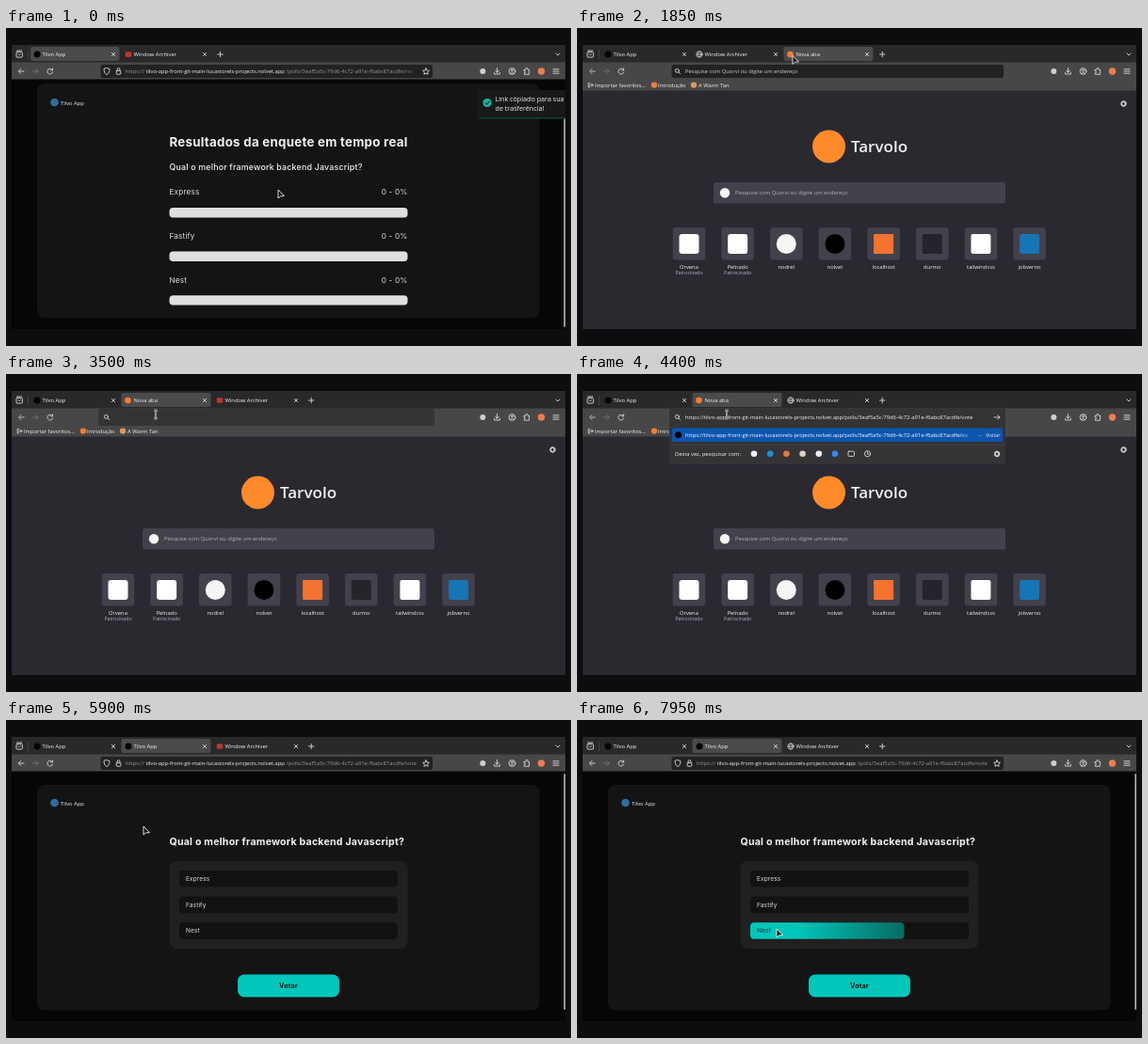
An HTML page for the animation above (8000 ms loop, 600 by 338 pixels).

```html
<!DOCTYPE html>
<html lang="pt-BR">
<head>
<meta charset="utf-8">
<title>Enquete em tempo real</title>
<style>
html, body { margin: 0; width: 100%; height: 100%; overflow: hidden; background: #0d0c0e; }
svg { display: block; width: 100vw; height: 100vh; }
text { font: 5.8px "Open Sans", "Noto Sans", sans-serif; fill: #f2f2f2; }
.page text { font-family: Inter, sans-serif; letter-spacing: .02em; }
.page .brand { font-size: 8.4px; font-weight: 700; letter-spacing: 0; }
.page .title { font-size: 13.3px; font-weight: 700; }
.page .ask { font-size: 8.9px; font-weight: 500; }
.page .row { font-size: 8.2px; fill: #dedede; }
.page .poll { font-size: 10.6px; font-weight: 700; }
.page .choice { font-size: 6.5px; fill: #dedede; }
.page .vote { font-size: 7.2px; font-weight: 700; fill: #0b1514; text-anchor: middle; }
.end { text-anchor: end; }
.mid { text-anchor: middle; }
.dim, .dim text { fill: #989898; }
.line { fill: none; stroke: #d8d8d8; stroke-width: .9; stroke-linecap: round; stroke-linejoin: round; }
.faint { stroke: #777; }

/* hard scene changes over one 8 s loop */
.cut { opacity: 0; animation: 8s step-end infinite; }
.results { animation-name: results; }
.later { animation-name: later; }
.newtab { animation-name: newtab; }
.search { animation-name: search; }
.focus { animation-name: focus; }
.list { animation-name: list; }
.blank { animation-name: blank; }
.loading { animation-name: loading; }
.loaded { animation-name: loaded; }
.skeleton { animation-name: skeleton; }
.address { animation-name: address; }
.idle { animation-name: idle; }
.plusHover { animation-name: plusHover; }
.arrow { animation-name: arrow; }
.hand { animation-name: hand; }
.beam { animation-name: beam; }
@keyframes results { 0% { opacity: 1 } 21.875%, 100% { opacity: 0 } }
@keyframes later { 0% { opacity: 0 } 21.875%, 100% { opacity: 1 } }
@keyframes newtab { 0% { opacity: 0 } 21.875% { opacity: 1 } 58.75%, 100% { opacity: 0 } }
@keyframes search { 0% { opacity: 0 } 21.875% { opacity: 1 } 41.875%, 100% { opacity: 0 } }
@keyframes focus { 0% { opacity: 0 } 41.875% { opacity: 1 } 57.5%, 100% { opacity: 0 } }
@keyframes list { 0% { opacity: 0 } 47.5% { opacity: 1 } 57.5%, 100% { opacity: 0 } }
@keyframes blank { 0% { opacity: 0 } 21.875% { opacity: 1 } 57.5%, 100% { opacity: 0 } }
@keyframes loading { 0% { opacity: 0 } 57.5% { opacity: 1 } 66.25%, 100% { opacity: 0 } }
@keyframes loaded { 0% { opacity: 0 } 66.25%, 100% { opacity: 1 } }
@keyframes skeleton { 0% { opacity: 0 } 58.75% { opacity: 1 } 66.25%, 100% { opacity: 0 } }
@keyframes address { 0% { opacity: 0 } 57.5%, 100% { opacity: 1 } }
@keyframes idle { 0% { opacity: 1 } 57.5% { opacity: 0 } 66.25%, 100% { opacity: 1 } }
@keyframes plusHover { 0% { opacity: 0 } 17% { opacity: 1 } 21.875%, 100% { opacity: 0 } }
@keyframes arrow { 0% { opacity: 1 } 26.25% { opacity: 0 } 36.25% { opacity: 1 } 39.5% { opacity: 0 } 65% { opacity: 1 } 100% { opacity: 1 } }
@keyframes hand { 0% { opacity: 0 } 26.25% { opacity: 1 } 36.25%, 100% { opacity: 0 } }
@keyframes beam { 0% { opacity: 0 } 39.5% { opacity: 1 } 65%, 100% { opacity: 0 } }

/* continuous motion */
.move { animation: 8s linear infinite; }
.toast { animation-name: toast; }
.scroll { animation-name: scroll; }
.recTab { animation-name: recTab; }
.newTabDrag { animation-name: drag; }
.rec { animation-name: rec; }
.globe { animation-name: globe; }
.pointer { animation-name: pointer; animation-timing-function: ease-in-out; }
.fill { width: 0; animation-name: fill; }
.page .picked { animation-name: picked; }
.dot { animation: dot .9s ease-in-out infinite alternate; }
@keyframes toast { 0%, .6% { transform: none } 5.6%, 100% { transform: translateX(100px) } }
@keyframes scroll { 0%, 1.2% { transform: none } 3.8%, 100% { transform: translateY(-2px) } }
@keyframes recTab { 0%, 30.625% { transform: none } 32.44%, 100% { transform: translateX(97px) } }
@keyframes drag {
  0%, 26.25% { transform: translateX(97px) } 31.25%, 31.875% { transform: translateX(50px) }
  35.6% { transform: translateX(3px) } 36.25%, 100% { transform: none }
}
@keyframes rec {
  0%, 8.125% { opacity: 1 } 14.375%, 26.875% { opacity: 0 } 33.125%, 45.625% { opacity: 1 }
  51.875%, 64.375% { opacity: 0 } 70.625%, 83.125% { opacity: 1 } 89.375%, 100% { opacity: 0 }
}
@keyframes globe {
  0%, 8.125% { opacity: 0 } 14.375%, 26.875% { opacity: 1 } 33.125%, 45.625% { opacity: 0 }
  51.875%, 64.375% { opacity: 1 } 70.625%, 83.125% { opacity: 0 } 89.375%, 100% { opacity: 1 }
}
@keyframes pointer {
  0%, 11.875% { transform: translate(289px, 172px) }
  17.5%, 22.5% { transform: translate(228px, 29px) }
  25.6%, 26.25% { transform: translate(239px, 33px) }
  31.25%, 31.875% { transform: translate(192px, 33px) }
  35.6%, 37.5% { transform: translate(145px, 33px) }
  40.6%, 65% { transform: translate(159px, 43px) }
  73%, 81% { transform: translate(146px, 113px) }
  94%, 100% { transform: translate(212px, 222px) }
}
@keyframes fill { 0%, 95% { width: 0 } 99.375% { width: 163px } 100% { width: 184px } }
@keyframes picked { 0%, 95% { fill: #dedede } 97%, 100% { fill: #10302d } }
@keyframes dot { from { transform: translateX(-2px) } to { transform: translateX(4px) } }
</style>
</head>
<body>
<svg viewBox="0 0 600 338" preserveAspectRatio="none">
<defs>
  <clipPath id="view"><rect x="6" y="54" width="588" height="266"/></clipPath>
  <linearGradient id="teal"><stop offset=".3" stop-color="#00c7b9"/><stop offset="1" stop-color="#086b64"/></linearGradient>
  <linearGradient id="fadeGrey" gradientUnits="userSpaceOnUse" x1="420" x2="441" y1="0" y2="0">
    <stop stop-color="#989898"/><stop offset="1" stop-color="#989898" stop-opacity="0"/></linearGradient>
  <linearGradient id="fadeRow" gradientUnits="userSpaceOnUse" x1="408" x2="424" y1="0" y2="0">
    <stop stop-color="#fff"/><stop offset="1" stop-color="#fff" stop-opacity="0"/></linearGradient>
  <path id="close" class="line" d="M-1.7-1.7 1.7 1.7M1.7-1.7-1.7 1.7"/>
  <g id="lens" class="line"><circle cx="-.6" cy="-.6" r="2"/><path d="M1 1 2.7 2.7"/></g>
  <g id="gear" class="line"><circle r="2.6" stroke-width="1.2" stroke-dasharray="1.3 .74"/><circle r="1.9"/></g>
  <g id="brand"><circle cx="51.5" cy="88" r="4.3" fill="#2c6f9f"/><text class="brand" x="58" y="91.2">Tilvo App</text></g>
  <g id="secure" class="line">
    <path d="M107 42.6 110 43.6C110 46.5 109 48.4 107 49.6 105 48.4 104 46.5 104 43.6Z"/>
    <rect x="117.2" y="45.4" width="4.6" height="3.8" rx=".7"/><path d="M118.1 45.2V44A1.4 1.4 0 0 1 120.9 44V45.2"/>
    <path d="M446 42.8 447 45 449.4 45.3 447.6 46.9 448.1 49.3 446 48.1 443.9 49.3 444.4 46.9 442.6 45.3 445 45Z"/>
  </g>
  <g id="domain"><text x="127" y="48.1" class="dim">https://</text><text x="148.5" y="48.1">tilvo-app-front-git-main-lucastorels-projects.nolvet.app</text></g>
</defs>

<rect width="600" height="338" fill="#0d0c0e"/>
<rect x="6" y="18" width="588" height="302" fill="#060606"/>

<g clip-path="url(#view)">
  <g class="page">
    <g class="cut results">
      <g class="move scroll">
        <rect x="33" y="59" width="533.5" height="249" rx="8" fill="#141415"/>
        <use href="#brand" y="-9"/>
        <text class="title" x="173.5" y="125.5">Resultados da enquete em tempo real</text>
        <text class="ask" x="173.5" y="151.3">Qual o melhor framework backend Javascript?</text>
        <g id="bars"></g>
      </g>
      <rect x="592.4" y="67" width="1.6" height="251" rx=".8" fill="#b4b4b4"/>
    </g>
    <g class="cut skeleton">
      <rect x="33" y="69" width="533.5" height="237" rx="8" fill="#141415"/>
      <use href="#brand"/>
      <rect x="173.5" y="122" width="253" height="21" rx="7" fill="#202020"/>
      <rect x="246" y="170.5" width="108" height="24" rx="7" fill="#00c7b9"/>
      <text class="vote" x="300" y="185.3">Votar</text>
    </g>
    <g class="cut loaded">
      <rect x="33" y="69" width="533.5" height="239.5" rx="8" fill="#141415"/>
      <use href="#brand"/>
      <text class="poll" x="173.5" y="133">Qual o melhor framework backend Javascript?</text>
      <rect x="173.5" y="150" width="253" height="93" rx="8" fill="#202020"/>
      <g id="choices"></g>
      <rect x="246" y="270.5" width="108" height="24" rx="7" fill="#00c7b9"/>
      <text class="vote" x="300" y="285.3">Votar</text>
      <rect x="592.4" y="57" width="1.6" height="251" rx=".8" fill="#b4b4b4"/>
    </g>
  </g>

  <g class="cut newtab">
    <rect x="6" y="54" width="588" height="266" fill="#2a2930"/>
    <rect x="6" y="54" width="588" height="12.5" fill="#474747"/>
    <path class="line" d="M13.5 58.5H12.2V63H13.5M13.6 60.7H17M15.6 59.3 17 60.7 15.6 62.1"/>
    <text x="19" y="62.8">Importar favoritos…</text>
    <circle cx="82" cy="60.6" r="3.2" fill="#f77b33"/><text x="86" y="62.8">Introdução</text>
    <circle cx="124" cy="60.6" r="3.2" fill="#d99a62"/><text x="129" y="62.8">A Warm Tan</text>
    <use href="#gear" x="580.5" y="80.5"/>
    <circle cx="267.5" cy="126" r="17.5" fill="#ff8a2a"/>
    <text x="291" y="132" style="font-size:17px;font-weight:600">Tarvolo</text>
    <rect x="145" y="164" width="310" height="22.5" rx="2.5" fill="#42414c"/>
    <circle cx="157" cy="175.3" r="5.2" fill="#f4f4f4"/>
    <text x="168" y="177.4" style="fill:#b4b3bc">Pesquise com Quorvi ou digite um endereço</text>
    <g id="tiles"></g>
  </g>

  <g class="cut results"><g class="move toast">
    <rect x="501" y="66" width="150" height="30.5" rx="2.5" fill="#181919"/>
    <rect x="502" y="95" width="149" height="1.4" fill="#0d453d"/>
    <circle cx="511" cy="79.5" r="4.6" fill="#13b49f"/>
    <path d="M508.8 79.6 510.5 81.3 513.4 77.9" fill="none" stroke="#181919" stroke-width="1.1"/>
    <text x="519.5" y="77.6" style="font-size:7.2px">Link copiado para sua área</text>
    <text x="519.5" y="87.8" style="font-size:7.2px">de trasferência!</text>
  </g></g>

  <g class="cut skeleton">
    <rect x="6" y="310.5" width="146" height="9.5" rx="1" fill="#3a3a3a"/>
    <text x="8" y="317.6" style="font-size:5.6px">tilvo-app-front-git-main-lucastorels-projects.nolvet.app</text>
  </g>
</g>

<!-- tab strip -->
<rect x="6" y="18" width="588" height="19" fill="#292929"/>
<g class="line"><rect x="11" y="25.5" width="6.4" height="5.6" rx="1"/><path d="M11.6 24H16.8M13 27.6 14.2 28.8 15.4 27.6"/><path d="M584 27 586 29 588 27"/></g>
<path d="M23.5 23V33" stroke="#4d4d4d" stroke-width=".7"/>
<rect class="cut results" x="26" y="20" width="94.5" height="15" rx="2" fill="#4b4b4b"/>
<circle cx="33" cy="28" r="3.5" fill="#050505"/><text x="38.5" y="30.1">Tilvo App</text><use href="#close" x="114" y="28"/>
<g class="move recTab">
  <g class="move rec"><rect x="126.8" y="25.3" width="6.4" height="5.4" rx="1" fill="#b8372b"/></g>
  <g class="move globe"><g class="line" style="stroke-width:.7"><circle cx="130" cy="28" r="3.2"/><ellipse cx="130" cy="28" rx="1.4" ry="3.2"/><path d="M126.8 28H133.2"/></g></g>
  <text x="135.5" y="30.1">Window Archiver</text><use href="#close" x="211" y="28"/>
</g>
<g class="cut later"><g class="move newTabDrag">
  <rect x="122.5" y="20" width="95" height="15" rx="2" fill="#4b4b4b"/>
  <g class="cut blank"><circle cx="129.5" cy="28" r="3.3" fill="#f77b33"/><text x="135.5" y="30.1">Nova aba</text></g>
  <g class="cut loading"><circle class="dot" cx="130" cy="28" r="1" fill="#d0d0d0"/></g>
  <g class="cut loaded"><circle cx="130" cy="28" r="3.5" fill="#050505"/></g>
  <g class="cut address"><text x="135.5" y="30.1">Tilvo App</text></g>
  <use href="#close" x="211" y="28"/>
</g></g>
<g class="cut plusHover"><rect x="219.5" y="20" width="16" height="15" rx="2" fill="#505050"/></g>
<path class="line cut results" d="M224.8 28H230.2M227.5 25.3V30.7"/>
<path class="line cut later" d="M321.5 28H326.9M324.2 25.3V30.7"/>

<!-- toolbar -->
<rect x="6" y="36.5" width="588" height="18" fill="#474747"/>
<g class="line">
  <path d="M19 46H13.5M15.8 43.5 13.3 46 15.8 48.5"/>
  <path class="faint" d="M28.5 46H34M31.7 43.5 34.2 46 31.7 48.5"/>
  <path class="cut idle" d="M49.3 44.6A2.9 2.9 0 1 0 49.6 47M49.6 42.9V44.9H47.6"/>
  <path class="cut loading" d="M44.4 43.8 48.8 48.2M48.8 43.8 44.4 48.2"/>
  <path d="M521.5 42.5V47M519.5 45.2 521.5 47.2 523.5 45.2M518.6 47.5V49H524.4V47.5"/>
  <circle cx="537.5" cy="46" r="3.4"/><circle cx="537.5" cy="45" r="1.1"/><path d="M535.4 48.4Q537.5 46.2 539.6 48.4"/>
  <path d="M550.4 44.4H552V43.4A1 1 0 0 1 554 43.4V44.4H555.6V49.2H550.4V47.8A1 1 0 0 0 550.4 45.8Z"/>
  <path d="M581 43.8H587M581 46H587M581 48.2H587"/>
</g>
<path class="line faint cut blank" d="M19 46H13.5M15.8 43.5 13.3 46 15.8 48.5"/>
<circle cx="506.3" cy="46" r="3" fill="#cfcfcf"/><circle cx="568.5" cy="46" r="3.7" fill="#ef7d4c"/>
<rect x="100.5" y="39" width="352.5" height="14" rx="2" fill="#222"/>
<g class="cut results"><use href="#secure"/><use href="#domain"/>
  <text x="297.6" y="48.1" style="fill:url(#fadeGrey)">/polls/3eaf5a5c-79d6-4c72-a91e-f6abc87acdfe/res</text></g>
<g class="cut search"><use href="#lens" x="107" y="46"/>
  <text x="115" y="48.1" style="fill:#cfcfcf">Pesquise com Quorvi ou digite um endereço</text></g>
<g class="cut address"><use href="#secure"/><use href="#domain"/>
  <text x="297.6" y="48.1" class="dim">/polls/3eaf5a5c-79d6-4c72-a91e-f6abc87acdfe/vote</text></g>

<!-- focused address field -->
<g class="cut focus"><rect x="98" y="37" width="357" height="18" rx="2.5" fill="#343434"/><use href="#lens" x="107" y="46"/></g>
<g class="cut list">
  <rect x="98" y="37" width="357" height="59" rx="2.5" fill="#343436"/>
  <use href="#lens" x="107" y="46"/>
  <text x="115" y="48.1">https://tilvo-app-front-git-main-lucastorels-projects.nolvet.app/polls/3eaf5a5c-79d6-4c72-a91e-f6abc87acdfe/vote</text>
  <path class="line" d="M443 46H449M446.8 43.8 449 46 446.8 48.2"/>
  <rect x="101" y="57.5" width="351" height="14.5" rx="2" fill="#0c55b0"/>
  <circle cx="107.5" cy="64.7" r="3.5" fill="#050505"/>
  <text x="115" y="66.8" style="fill:url(#fadeRow)">https://tilvo-app-front-git-main-lucastorels-projects.nolvet.app/polls/3eaf5a5c-79d6-4c72-a91e-f6abc87acdfe/vo</text>
  <text x="426" y="66.8">···</text><text class="end" x="449.5" y="66.8" style="font-size:5.4px">Visitar</text>
  <path d="M98 75.5H455" stroke="#4a4a4c" stroke-width=".6"/>
  <text x="104" y="87.2">Desta vez, pesquisar com:</text>
  <g id="engines"></g>
  <g class="line"><rect x="288" y="82.2" width="6.4" height="5.2" rx=".7"/><circle cx="308.5" cy="84.8" r="3.1"/><path d="M308.5 83V85H310"/></g>
  <use href="#gear" x="446" y="85"/>
</g>

<!-- pointer -->
<g class="move pointer">
  <path class="cut arrow" d="M0 0V9L2.5 6.9 6.4 6.6Z" fill="#0a0a0a" stroke="#f4f4f4" stroke-width=".9" stroke-linejoin="round"/>
  <rect class="cut hand" x="-2.6" y="1" width="5.6" height="5.6" rx="1.8" fill="#0a0a0a" stroke="#f4f4f4" stroke-width=".9"/>
  <g class="cut beam" fill="none"><path d="M-2-4.3H-.6L0-3.7.6-4.3H2M0-3.7V3.7M-2 4.3H-.6L0 3.7.6 4.3H2" stroke="#fff" stroke-width="2"/>
    <path d="M-2-4.3H-.6L0-3.7.6-4.3H2M0-3.7V3.7M-2 4.3H-.6L0 3.7.6 4.3H2" stroke="#111" stroke-width=".9"/></g>
</g>
</svg>
<script>
const put = (id, items, draw) => {
  document.getElementById(id).innerHTML = items.map(draw).join('');
};
const frameworks = ['Express', 'Fastify', 'Nest'];

put('bars', frameworks, (name, i) => {
  const y = 191 + i * 46.6;
  return `<text class="row" x="173.5" y="${y - 13.7}">${name}</text>
    <text class="row end" x="426.5" y="${y - 13.7}">0 - 0%</text>
    <rect x="173.5" y="${y}" width="253" height="10.4" rx="4" fill="#dfdfdf"/>`;
});

put('choices', frameworks, (name, i) => {
  const y = 160 + i * 27.6;
  const last = i === 2;
  return `<rect x="184" y="${y}" width="232" height="17.6" rx="4" fill="#121212"/>
    ${last ? `<rect class="move fill" x="184" y="${y}" height="17.6" rx="4" fill="url(#teal)"/>` : ''}
    <text class="choice ${last ? 'move picked' : ''}" x="191" y="${y + 11.2}">${name}</text>`;
});

const shortcuts = [
  ['Orvena', '#fff', 3, 'Patrocinado'], ['Pelnado', '#fff', 3, 'Patrocinado'],
  ['nodrel', '#f5f5f5', 10.5], ['nolvet', '#000', 10.5], ['localhost', '#f5722f', 1],
  ['durmo', '#25242a', 2], ['tailwindcss', '#fff', 2], ['jobverno', '#1675b5', 2]
];
put('tiles', shortcuts, ([name, color, radius, note], i) => {
  const x = 119 + i * 51.65;
  return `<rect x="${x - 17.3}" y="212" width="34.6" height="34.6" rx="3" fill="#42414c"/>
    <rect x="${x - 10.5}" y="219" width="21" height="21" rx="${radius}" fill="${color}"/>
    <text class="mid" x="${x}" y="256">${name}</text>
    ${note ? `<text class="mid" x="${x}" y="262.2" style="font-size:5.2px;fill:#b4b3bc">${note}</text>` : ''}`;
});

put('engines', ['#f2f2f2', '#1f8fd0', '#dd7a45', '#d8d0c4', '#f2f2f2', '#2f8be6'], (color, i) =>
  `<circle cx="${188 + i * 17.2}" cy="84.8" r="3.3" fill="${color}"/>`);
</script>
</body>
</html>
```
